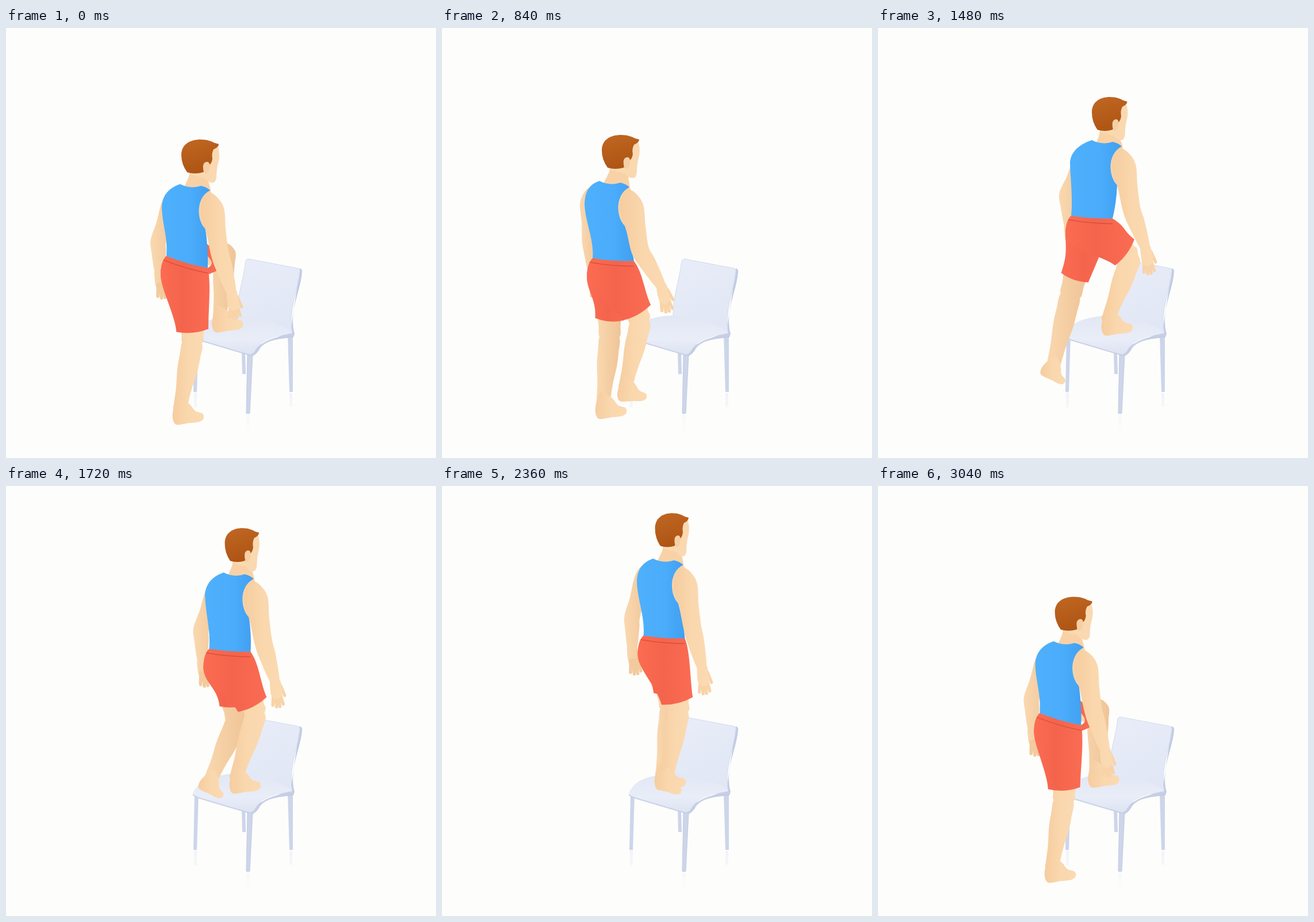
Recreate the animation shown at these times as an HTML page. Size 748x748 px, loop 3080 ms.

```html
<!DOCTYPE html>
<html lang="en">
<head>
<meta charset="utf-8">
<title>Chair step-up</title>
<style>
  html, body { margin: 0; width: 100%; height: 100%; overflow: hidden; background: #fdfdfc; }
  svg { display: block; width: 100vw; height: 100vh; }
</style>
</head>
<body>
<svg viewBox="0 0 748 748">
  <defs>
    <linearGradient id="skin"><stop offset="0" stop-color="#f5cda0"/><stop offset=".5" stop-color="#fad7ad"/><stop offset="1" stop-color="#fbdab2"/></linearGradient>
    <linearGradient id="skinFar"><stop offset="0" stop-color="#fad8af"/><stop offset="1" stop-color="#efc497"/></linearGradient>
    <linearGradient id="tank"><stop offset="0" stop-color="#4fb0fc"/><stop offset=".6" stop-color="#4aacfb"/><stop offset="1" stop-color="#419ff0"/></linearGradient>
    <linearGradient id="shorts"><stop offset="0" stop-color="#fb6c53"/><stop offset=".45" stop-color="#f4644c"/><stop offset="1" stop-color="#fa6c53"/></linearGradient>
    <linearGradient id="hair" x2=".3" y2="1"><stop offset="0" stop-color="#c06722"/><stop offset="1" stop-color="#ae5515"/></linearGradient>
    <linearGradient id="seat" x2="0" y2="1"><stop offset="0" stop-color="#e2e7f4"/><stop offset=".6" stop-color="#e9edf8"/><stop offset="1" stop-color="#dde3f1"/></linearGradient>
    <linearGradient id="back" x2=".4" y2="1"><stop offset="0" stop-color="#e9edf9"/><stop offset="1" stop-color="#e2e7f5"/></linearGradient>
    <linearGradient id="glow" x2="0" y2="1"><stop offset="0" stop-color="#cfd6e8" stop-opacity=".25"/><stop offset="1" stop-color="#cfd6e8" stop-opacity="0"/></linearGradient>
  </defs>

  <g id="chair">
    <path fill="url(#glow)" d="M327 634h5v26h-5zM418 673h6v32h-6zM493 635h5v24h-5z"/>
    <path fill="#cdd5ea" d="M410 560h6l1 42h-6zM328 536h7l-3 97h-6zM490 533h9v100h-6z"/>
    <path fill="#c3cce4" d="M511 418Q516 419 515 425C513 452 500 475 499 508Q499 522 502 532L500 538C470 541 452 544 442 557Q436 568 428 571L420 560L495 528Z"/>
    <path fill="url(#back)" stroke="#d3daec" d="M423 402L508 418Q512 419 511 424C508 452 497 476 496 508Q496 522 498 531L402 503C401 468 413 440 417 406Q418 401 423 402Z"/>
    <path fill="url(#seat)" d="M402 500C375 501 348 508 338 517Q326 528 325 536Q328 540 340 543L423 568Q430 568 434 560C443 546 458 538 498 531C490 518 440 505 402 500Z"/>
    <path fill="none" stroke="#c9d1e6" stroke-width="2" d="M325 537Q330 541 340 544L424 569Q431 569 435 561C445 547 462 539 500 533"/>
    <path fill="#cdd5e9" stroke="#b9c4df" stroke-width=".8" d="M420 568L429 569L424 670Q421 672 418 670Z"/>
  </g>

  <g id="man">
    <path id="lArm" fill="url(#skinFar)"/>
    <path id="lFingers" fill="none" stroke="#f3ca9d" stroke-width="5.5" stroke-linecap="round"/>
    <path id="lLeg" fill="url(#skinFar)"/>
    <path id="lFoot" fill="url(#skin)"/>
    <path id="lShorts" fill="url(#shorts)"/>
    <path id="rLeg" fill="url(#skin)"/>
    <path id="rFoot" fill="url(#skin)"/>
    <path id="neck" fill="#f8d2a6"/>
    <path id="tankTop" fill="url(#tank)"/>
    <path id="rShorts" fill="url(#shorts)"/>
    <path id="band" fill="none" stroke="#d9503a" stroke-width="1.5"/>
    <path id="rFingers" fill="none" stroke="#f8d3a8" stroke-width="5.5" stroke-linecap="round"/>
    <path id="rArm" fill="url(#skin)"/>
    <g id="headGroup">
      <path fill="#fad9b1" d="M328 205L369 201C373 212 372 222 370 229L368 238L367 248C367 257 366 263 361 264Q353 265 346 256L322 250Z"/>
      <path fill="url(#hair)" d="M307 216C307 197 322 189 340 189C351 189 358 192 364 195L371 197Q370 203 362 206Q358 214 360 222Q359 230 355 233L344 246Q330 250 317 246Q307 232 307 216Z"/>
      <path fill="#f6cfa4" d="M344 236C344 227 354 225 355 232C356 240 353 248 348 248Q344 246 344 236Z"/>
    </g>
  </g>
</svg>
<script>
const LOOP = 3080, STEP = 40;

// Key poses of the trunk: time, hip x, hip y, forward lean, arm swing.
const TRUNK = [
  [0, 315, 426, .5, 0],
  [320, 306, 425, 0, 0],
  [840, 298, 422, 0, 1],
  [1160, 319, 424, .8, .5],
  [1480, 372, 348, 1, .2],
  [2000, 399, 276, 0, -.2],
  [2260, 392, 274, .1, -.2],
  [2680, 358, 351, .6, -.6]
];

// Each ankle rests on the floor or on the seat and steps between them.
const LEGS = {
  l: {
    side: -1, floor: [281, 645], seat: [384, 494], hem: .74, width: 25,
    up: { start: 1260, end: 1940, lift: 30, droop: 1 },
    down: { start: 2980, end: 3460, lift: 25, droop: 0 }
  },
  r: {
    side: 1, floor: [304, 655], seat: [403, 500], hem: .82, width: 28,
    up: { start: 720, end: 1180, lift: 15, droop: .25 },
    down: { start: 2200, end: 2960, lift: 25, droop: 1 }
  }
};
const THIGH = 119, SHIN = 105;
const FORWARD = [.63, -.24];   // one unit ahead, as seen on screen

const $ = id => document.getElementById(id);
const draw = (id, d) => $(id).setAttribute('d', d);
const clamp = v => Math.min(1, Math.max(0, v));
const add = (p, x, y) => [p[0] + x, p[1] + y];
const mix = (p, q, k) => [p[0] + (q[0] - p[0]) * k, p[1] + (q[1] - p[1]) * k];
const unit = (p, q) => {
  const x = q[0] - p[0], y = q[1] - p[1], len = Math.hypot(x, y) || 1;
  return [x / len, y / len];
};
const str = (...points) => points.map(p => p[0].toFixed(1) + ' ' + p[1].toFixed(1)).join(' ');

// Monotone cubic through the looping trunk keys.
function trunkValue(column, t) {
  const n = TRUNK.length;
  const key = i => TRUNK[(i + n) % n];
  const time = i => key(i)[0] + Math.floor(i / n) * LOOP;
  const slope = i => (key(i + 1)[column] - key(i)[column]) / (time(i + 1) - time(i));
  const tangent = i => {
    const a = slope(i - 1), b = slope(i);
    return a * b > 0 ? 2 * a * b / (a + b) : 0;
  };
  let i = n - 1;
  while (time(i) > t) i--;
  const span = time(i + 1) - time(i), u = (t - time(i)) / span, v = 1 - u;
  return key(i)[column] * (1 + 2 * u) * v * v + key(i + 1)[column] * u * u * (3 - 2 * u)
    + span * u * v * (tangent(i) * v - tangent(i + 1) * u);
}

function footPose({ floor, seat, up, down }, t) {
  if (t < down.end - LOOP) t += LOOP;
  const rising = t < down.start, step = rising ? up : down;
  const u = clamp((t - step.start) / (step.end - step.start));
  const eased = u * u * (3 - 2 * u);
  const ankle = add(mix(floor, seat, rising ? eased : 1 - eased), 0, -step.lift * 4 * u * (1 - u));
  const toe = add(ankle, ...mix([41, 18], [17, 36], Math.sin(Math.PI * u) * step.droop));
  return { ankle, toe };
}

// Two-bone solution in the walking plane; the knee always points ahead.
function kneePoint(hip, ankle) {
  const s = (ankle[0] - hip[0]) / FORWARD[0];
  const h = hip[1] - ankle[1] + FORWARD[1] * s;
  const d = Math.hypot(s, h), reach = Math.min(d, THIGH + SHIN);
  const along = (THIGH ** 2 - SHIN ** 2 + reach ** 2) / (2 * reach);
  const out = Math.sqrt(Math.max(0, THIGH ** 2 - along ** 2));
  const ks = (s * along - h * out) / d, kh = (h * along + s * out) / d;
  return add(hip, FORWARD[0] * ks, FORWARD[1] * ks - kh);
}

function smooth(points) {
  const n = points.length, at = i => points[(i + n) % n];
  let d = 'M' + str(points[0]);
  for (let i = 0; i < n; i++) {
    const [a, b, c, e] = [at(i - 1), at(i), at(i + 1), at(i + 2)];
    d += 'C' + str(add(b, (c[0] - a[0]) / 6, (c[1] - a[1]) / 6),
                   add(c, (b[0] - e[0]) / 6, (b[1] - e[1]) / 6), c);
  }
  return d + 'Z';
}

// Rounded, tapered tube around a centre line of [point, half width].
function limb(...nodes) {
  const last = nodes.length - 1, left = [], right = [];
  nodes.forEach(([p, w], i) => {
    const [x, y] = unit(nodes[Math.max(i - 1, 0)][0], nodes[Math.min(i + 1, last)][0]);
    left.push(add(p, -y * w, x * w));
    right.unshift(add(p, y * w, -x * w));
  });
  const cap = (i, j) => {
    const [p, w] = nodes[i], [x, y] = unit(nodes[j][0], p);
    return add(p, x * w * .75, y * w * .75);
  };
  return smooth([...left, cap(last, last - 1), ...right, cap(0, 1)]);
}

// Places [along, across] points in the frame of a segment.
function inFrame(from, to, points) {
  const x = to[0] - from[0], y = to[1] - from[1];
  return points.map(([a, b]) => add(from, a * x - b * y, a * y + b * x));
}

const foot = (ankle, toe) => smooth(inFrame(ankle, toe, [
  [-.2, -.2], [-.19, .25], [-.08, .6], [.16, .78], [.6, .52], [.93, .32], [1.03, .14], [.92, -.02], [.62, 0], [.28, -.16]
]));

const leg = (hem, knee, ankle) =>
  limb([mix(hem, knee, -.3), 19], [mix(hem, knee, .4), 19], [knee, 17.5]) +
  limb([knee, 17], [mix(knee, ankle, .22), 18], [mix(knee, ankle, .45), 17.5], [mix(knee, ankle, .75), 13.5], [ankle, 12], [mix(knee, ankle, 1.1), 11]);

const arm = (top, shoulder, elbow, wrist, tip, [a, b, c, d]) =>
  limb([top, a], [shoulder, b], [mix(shoulder, elbow, .5), c], [elbow, d], [mix(elbow, wrist, .35), d - 1], [wrist, 8]) +
  limb([mix(wrist, tip, -.1), 8], [mix(wrist, tip, .25), 10], [mix(wrist, tip, .52), 9]);

function fingers(wrist, tip) {
  let d = '';
  const stroke = (...ends) => d += 'M' + str(...inFrame(wrist, tip, ends));
  for (let k = -1.5; k <= 1.5; k++) stroke([.42, k * .08], [.95 - .04 * k * k, k * .13]);
  stroke([.15, -.18], [.55, -.29]);
  return d;
}

function shortsLeg(hips, hipL, hipR, hem, width) {
  const bum = add(hipL, -10, 34);
  const [x, y] = unit(hips, hem);
  const inner = add(hem, -y * width, x * width), outer = add(hem, y * width, -x * width);
  return 'M' + str(hipL) + 'C' + str(add(hipL, -7, 7), add(bum, 0, -16), bum) +
    'C' + str(add(bum, 1, 25), add(inner, -x * 32, -y * 32), inner) +
    'Q' + str(add(hem, x * 8, y * 8), outer) +
    'C' + str(add(outer, -x * 28 + 2, -y * 28), add(hipR, x * 24 + 4, y * 24), hipR) +
    'Q' + str(add(mix(hipL, hipR, .5), -4, 3), hipL) + 'Z';
}

const armhole = (chest, pit) => 'C' + str(add(chest, 26, 24), add(chest, 29, 64), pit);

function tankPath(chest, strap, pit, hipL, hipR, lean) {
  const side = add(chest, -26 - 12 * lean, 40);
  return 'M' + str(chest) + 'C' + str(add(chest, 10, 6), add(chest, 25, 7), add(chest, 36, 3)) +
    'Q' + str(add(chest, 46, 5), strap) + armhole(chest, pit) +
    'Q' + str(add(mix(pit, hipR, .55), 3, 0), hipR) +
    'Q' + str(add(mix(hipL, hipR, .5), -4, 4), hipL) +
    'C' + str(add(hipL, 3, -32), add(side, 1, 32), side) +
    'C' + str(add(side, 1, -22), add(chest, -18, 6), chest) + 'Z';
}

function render(t) {
  const [x, y, lean, swing] = [1, 2, 3, 4].map(column => trunkValue(column, t));
  const hips = [x, y];
  const chest = add(hips, -24 + 24 * lean, -156 + 3 * lean);
  const strap = add(chest, 52, 11), pit = add(chest, 44, 78);
  const feet = { l: footPose(LEGS.l, t), r: footPose(LEGS.r, t) };

  // The pelvis tips towards the lower right foot.
  const tilt = 5 + 16 * clamp((feet.r.ankle[1] - feet.l.ankle[1] - 12) / 50);
  const hipL = add(hips, -36, -19 - tilt / 2), hipR = add(hips, 36, -19 + tilt / 2);

  for (const name in LEGS) {
    const { side, hem, width } = LEGS[name], { ankle, toe } = feet[name];
    const joint = add(hips, 8 * side, 3 * side);
    const knee = kneePoint(joint, ankle), hemPoint = mix(joint, knee, hem);
    draw(name + 'Leg', leg(hemPoint, knee, ankle));
    draw(name + 'Foot', foot(ankle, toe));
    draw(name + 'Shorts', shortsLeg(hips, hipL, hipR, hemPoint, width));
  }

  const lShoulder = add(chest, -19, 40), rShoulder = add(chest, 56, 46);
  const lElbow = add(lShoulder, -11 - 16 * lean + 13 * swing, 63 - 8 * lean);
  const lWrist = add(lShoulder, -10 - 14 * lean + 18 * swing, 119 - 9 * lean);
  const rElbow = add(rShoulder, 13 + 2 * swing, 75);
  const rWrist = add(rShoulder, 34 + 18 * swing, 144 - 6 * swing);
  const lTip = add(lWrist, 7, 46);
  const rTip = add(rWrist, 6 + 5 * swing, 46);
  draw('lArm', arm(add(chest, -13, 19), lShoulder, lElbow, lWrist, lTip, [11, 15, 13, 13.5]));
  draw('lFingers', fingers(lWrist, lTip));
  draw('rArm', arm(add(chest, 51, 24), rShoulder, rElbow, rWrist, rTip, [12, 20.5, 17, 15.5]));
  draw('rFingers', fingers(rWrist, rTip));

  const bandL = add(hipL, -5, 7), bandR = add(hipR, 0, 9);
  draw('band', 'M' + str(bandL) + 'Q' + str(add(mix(bandL, bandR, .5), -3, 3), bandR));
  draw('tankTop', tankPath(chest, strap, pit, hipL, hipR, lean));

  const head = add(chest, -303 - 4 * lean, -269 + 5 * lean);
  const neck = limb([add(head, 337, 238), 15], [add(head, 336, 254), 16], [add(chest, 30, 8), 23], [add(chest, 28, 20), 22]);
  draw('neck', neck + 'M' + str(strap) + armhole(chest, pit) + 'Q' + str(add(chest, 72, 40), strap) + 'Z');

  const width = 1.02 - .11 * (425 - y) / 150;   // the head turns away as he climbs
  $('headGroup').setAttribute('transform', `translate(${head[0] + 307 * (1 - width)} ${head[1]}) scale(${width} 1)`);
}

const start = performance.now();
function tick() {
  const t = (performance.now() - start) % LOOP;
  render(Math.floor(t / STEP) * STEP);
  requestAnimationFrame(tick);
}
tick();
</script>
</body>
</html>
```
